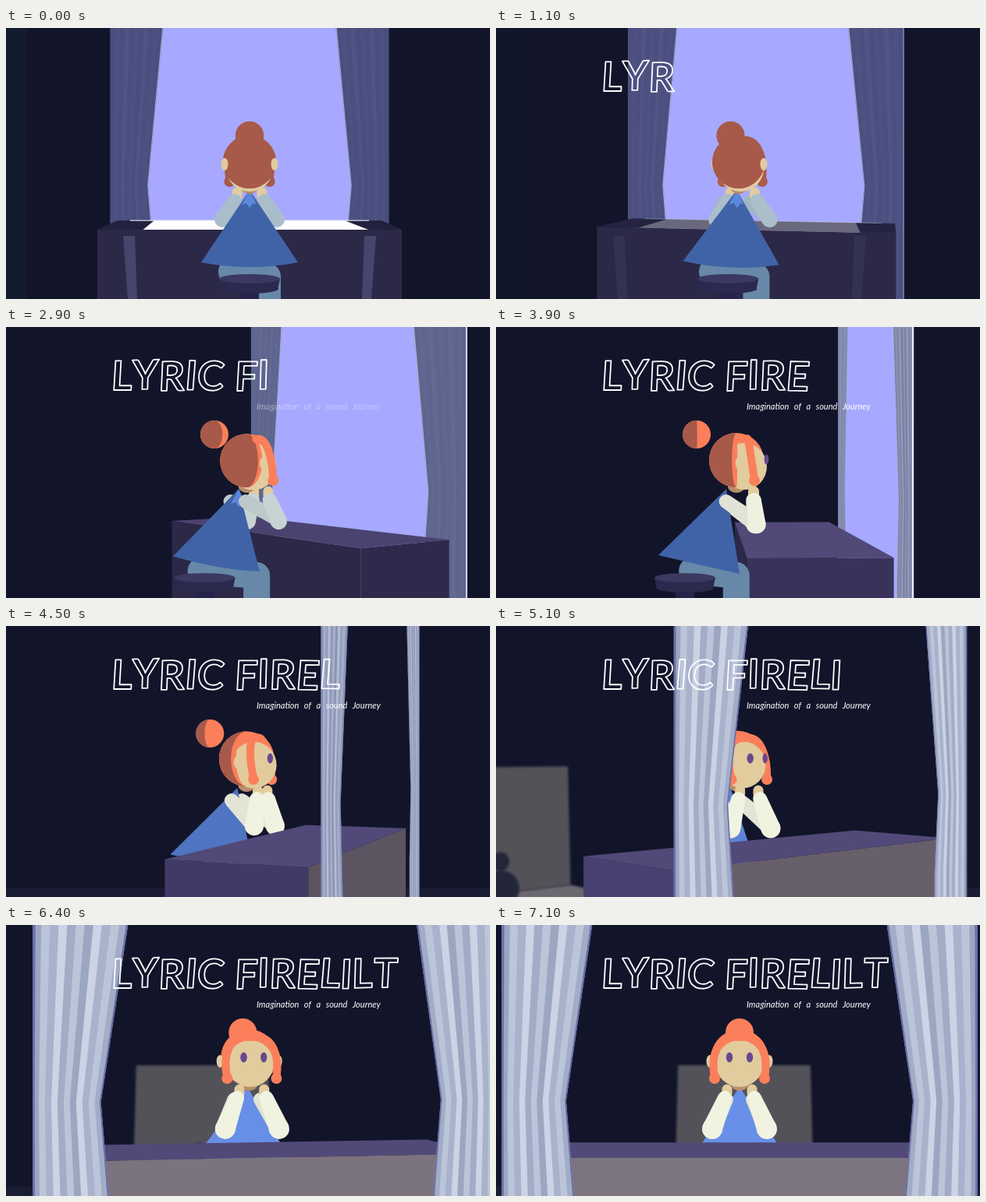
An HTML page with a canvas for the animation above (7200 ms loop, 620 px wide and 348 px high).

```html
<!DOCTYPE html>
<html>
<head>
<meta charset="utf-8">
<style>
html, body { margin: 0; width: 100%; height: 100%; overflow: hidden; background: #12152a; }
canvas { display: block; }
</style>
</head>
<body>
<canvas id="stage" width="620" height="348"></canvas>
<script>
const ctx = document.getElementById('stage').getContext('2d');
const LOOP = 7200, STEP = 100, FLOOR = 360, CENTER = 312, HORIZON = 168, CAMERA = 900;
const TITLE = [['LYRIC', 134], ['FIRELILT', 292]];
const SUBTITLE = 'Imagination of a sound Journey';
const SKIN = '#e2cb9d', HAIR = [250, 127, 90], HAIR_DARK = [167, 89, 74];
const SIDES = [-1, 1];

// Camera orbit: times in ms and degrees around the girl
const TIMES = [0, 2000, 2900, 3900, 5100, 5800, 7100];
const TURN = [0, 30, 55, 88, 137, 157, 180];

let time, angle, cos, sin, front;  // front: 0 behind the girl, 1 facing her

const clamp = v => Math.max(0, Math.min(1, v));
const mix = (a, b, f) => `rgb(${a.map((v, i) => Math.round(v + (b[i] - v) * clamp(f)))})`;

// Smooth curve through the orbit keys, at rest on both ends
function orbit() {
  const last = TIMES.length - 1;
  let i = 0;
  while (i < last - 1 && time >= TIMES[i + 1]) i++;
  const span = TIMES[i + 1] - TIMES[i], u = (time - TIMES[i]) / span;
  const slope = k => k % last === 0 ? 0
    : (TURN[k + 1] - TURN[k - 1]) / (TIMES[k + 1] - TIMES[k - 1]) * span;
  const rise = TURN[i + 1] - TURN[i], a = slope(i), b = slope(i + 1);
  return TURN[i] + u * (a + u * (3 * rise - 2 * a - b + u * (a + b - 2 * rise)));
}

// Position after the turn: flat for the girl, in perspective for the room
const depth = (x, z) => z * cos - x * sin;
const screenX = (x, z) => CENTER + x * cos + z * sin;
function project(x, height, z) {
  const scale = (1.1 - .11 * cos) / (1 + depth(x, z) / CAMERA);
  return [CENTER + (x * cos + z * sin) * scale, HORIZON + height * scale];
}

function poly(color, ...points) {
  ctx.fillStyle = color;
  ctx.beginPath();
  for (const p of points) ctx.lineTo(...p);
  ctx.fill();
}

function oval(color, x, y, rx, ry = rx) {
  ctx.fillStyle = color;
  ctx.beginPath();
  ctx.ellipse(x, y, rx, ry, 0, 0, 7);
  ctx.fill();
}

function limb(color, width, ...points) {
  ctx.strokeStyle = color;
  ctx.lineWidth = width;
  ctx.lineCap = ctx.lineJoin = 'round';
  ctx.beginPath();
  for (const p of points) ctx.lineTo(...p);
  ctx.stroke();
}

// Round-ended shape from a circle of radius r1 to one of radius r2
function taper(color, x1, y1, r1, x2, y2, r2) {
  const a = Math.atan2(y2 - y1, x2 - x1) + Math.PI / 2, c = Math.cos(a), s = Math.sin(a);
  oval(color, x1, y1, r1);
  oval(color, x2, y2, r2);
  poly(color, [x1 + r1 * c, y1 + r1 * s], [x2 + r2 * c, y2 + r2 * s],
    [x2 - r2 * c, y2 - r2 * s], [x1 - r1 * c, y1 - r1 * s]);
}

// The part of a ball left of its terminator; k runs from -1 (none) to 1 (all)
function ballSide(color, x, y, r, k) {
  if (k <= -1) return;
  ctx.fillStyle = color;
  ctx.beginPath();
  ctx.arc(x, y, r, Math.PI / 2, Math.PI * 1.5);
  ctx.ellipse(x, y, r * Math.abs(k), r, 0, -Math.PI / 2, Math.PI / 2, k < 0);
  ctx.fill();
}

function room(outside) {
  ctx.fillStyle = '#12152a';
  ctx.fillRect(0, 0, 620, 348);
  if (!outside) {
    ctx.globalAlpha = clamp(1 - time / 1500);
    ctx.fillStyle = '#131b2e';
    ctx.fillRect(0, 0, 26, 348);
    ctx.globalAlpha = 1;
    return;
  }
  ctx.fillStyle = '#1a1c33';
  ctx.fillRect(0, 336, 620, 12);
  const wall = (x, h) => project(x, h, -550), [shadowX, shadowY] = wall(0, 165);
  ctx.filter = 'blur(1.5px)';
  poly('#535259', wall(-121, 16), wall(105, 16), wall(110, 215), wall(-126, 215));
  poly('#6b6870', wall(-126, 215), wall(110, 215), project(110, 215, -400), project(-126, 215, -400));
  oval('#23253a', shadowX, shadowY, 11, 12);
  oval('#23253a', shadowX, shadowY + 35, 24);
  ctx.filter = 'none';
}

function curtain(side, outside) {
  const at = (x, h) => project(side * x, h, 150);
  const [outer] = at(210, 0), [top] = at(130, 0), waist = at(153, 40), hem = at(146, 124);
  const panel = (color, a, b) => {
    const x = (edge, f) => outer + (edge - outer) * f;
    poly(color, [x(top, a), 0], [x(top, b), 0], [x(waist[0], b), waist[1]], [x(hem[0], b), hem[1]],
      [x(hem[0], b), FLOOR], [x(hem[0], a), FLOOR], [x(hem[0], a), hem[1]], [x(waist[0], a), waist[1]]);
  };
  panel(mix([73, 78, 126], [155, 166, 193], front * 1.15), 0, 1);
  const folds = 11, strength = .03 + .6 * clamp(front * 1.6 - .4);
  for (let i = 1; i < folds; i++) {
    const light = i % 2 ? .5 + i * 5 % 4 / 6 : i % 3 / 8;
    panel(`rgba(232,238,250,${strength * light})`, i / folds, (i + 1) / folds);
  }
  if (outside) panel('#6a70ab', 0, .03);
  panel(outside ? '#686ba8' : 'rgba(225,228,255,.6)', .98, 1);
}

function windowView() {
  const [left] = project(-210, 0, 150), [right] = project(210, 0, 150);
  ctx.fillStyle = '#a6a9ff';
  ctx.fillRect(left, 0, right - left, 348);
  for (const side of SIDES) curtain(side, false);
  limb(`rgba(240,242,255,${sin})`, 2, [right - 1, 0], [right - 1, FLOOR]);
}

function desk() {
  const top = (x, z) => project(x * 197, 92, z);
  const a = top(-1, 135), b = top(1, 135), c = top(1, 0), d = top(-1, 0);
  const face = (color, p, q) => {
    if (q[0] > p[0]) poly(color, p, q, [q[0], FLOOR], [p[0], FLOOR]);
  };
  face('#2c2847', d, c);
  face(mix([39, 34, 63], [77, 69, 120], front), c, b);
  face(mix([92, 84, 96], [124, 116, 126], front * 5 - 4), b, a);
  poly(mix([34, 33, 62], [81, 73, 120], front * 4), a, b, c, d);
  ctx.globalAlpha = clamp(1 - time / 1600);
  poly('#fff', top(-.72, 135), top(.72, 135), top(.78, 0), top(-.7, 0));
  limb('#fff', 1, top(-.9, 135), top(.9, 135));
  for (const side of SIDES) {
    const x = CENTER + side * 190;
    poly('#46466c', [x - side * 28, 267], [x - side * 43, 267], [x - side * 46, 348], [x - side * 34, 348]);
  }
  ctx.globalAlpha = 1;
}

function arm(side) {
  const light = front * 2, color = mix([170, 189, 202], [241, 243, 225], light);
  const shade = mix([160, 180, 194], [226, 229, 214], light);
  const elbow = screenX(side * 35, 21), elbowY = 252 - 8 * cos, r = 11.5 - 1.5 * cos;
  const hand = screenX(side * 16, 18);
  taper(shade, screenX(side * 17, -18), 224, 9, elbow, elbowY, r - 1);
  limb(SKIN, 13, [hand, 211], [hand, 216]);
  taper(color, elbow, elbowY + 2, r, hand + side * cos * 3, 222, 9);
}

function lock(side) {
  const spread = side * (.9 - .1 * cos), at = (x, z) => screenX(spread * x, z);
  const color = mix(HAIR_DARK, HAIR, front * 5), tip = at(32, 18);
  ctx.strokeStyle = color;
  ctx.lineWidth = 10;
  ctx.lineCap = 'round';
  ctx.beginPath();
  ctx.moveTo(at(0, 10), 144);
  ctx.bezierCurveTo(at(30, 10), 140, at(37, 14), 170, tip, 196);
  ctx.stroke();
  oval(color, tip, 197, 7);
}

function bun() {
  const x = screenX(0, -55);
  oval(mix(HAIR_DARK, HAIR, front * 5), x, 138, 18);
  ballSide(mix(HAIR_DARK, HAIR, 0), x, 138, 18, cos);
}

const earX = side => side * (35 - 3 * cos);
const ear = side => oval(SKIN, screenX(earX(side), -2), 175, 4.5, 8);

function head() {
  const x = CENTER - 4 * sin, y = 171 + cos, r = 35 - cos;
  const lit = mix(HAIR_DARK, HAIR, front * 5), dark = mix(HAIR_DARK, HAIR, 0);
  const farLock = s => depth(s * 30, 18) > 0, farEar = s => depth(earX(s), -2) > 0;
  const bunInFront = depth(0, -55) < 0;
  oval('#b98d6b', x, 204, 11, 9);
  if (!bunInFront) bun();
  SIDES.filter(farLock).forEach(lock);
  SIDES.filter(farEar).forEach(ear);
  oval(lit, x, y, r);
  oval(SKIN, CENTER + 6 * sin, 179 + cos, 30 - sin, 30);
  ballSide(lit, x, y, r, cos);
  ballSide(dark, x, y, r, cos - .2 * sin);
  SIDES.filter(s => !farEar(s)).forEach(ear);
  for (const s of SIDES) {
    const d = depth(s * 13, 34);
    if (d < -3) oval('#67488f', screenX(s * 13, 34), 170, 2.2 - d / 17, 6.5);
  }
  SIDES.filter(s => !farLock(s)).forEach(lock);
  if (bunInFront) bun();
}

function dress() {
  const x = screenX(0, -17), y = 208, middle = screenX(0, -52), half = Math.hypot(62 * cos, 52 * sin);
  const tilt = 12 * sin, hem = 301 + 4 * sin;
  ctx.fillStyle = mix([64, 99, 168], [104, 144, 232], front * 2 - 1);
  ctx.beginPath();
  ctx.moveTo(x, y);
  ctx.lineTo(middle - half, hem - tilt);
  ctx.quadraticCurveTo(middle, hem + 12 * Math.max(0, cos), middle + half, hem + tilt);
  ctx.fill();
  if (cos > .3) {
    poly('#5c87dc', [x, y], [x - 10, y + 19], [x - 4, y + 17], [x, y + 23], [x + 5, y + 17], [x + 9, y + 19]);
  }
}

function stool() {
  const x = screenX(0, -70), y = 322;
  poly('#2b294d', [x - 39, y], [x + 39, y], [x + 36, y + 14], [x - 36, y + 14]);
  oval('#2b294d', x, y + 13, 37, 6);
  oval('#3b3961', x, y, 39, 6);
  poly('#25234a', [x - 12, y + 18], [x + 12, y + 18], [x + 12, FLOOR], [x - 12, FLOOR]);
}

function girl() {
  const near = s => depth(s * 35, 21) < 0, knee = screenX(23, -5);
  SIDES.filter(s => !near(s)).forEach(arm);
  limb('#6788a8', 34, [screenX(-23, -60), 313], [knee, 319], [knee, FLOOR]);
  dress();
  stool();
  const parts = [() => SIDES.filter(near).forEach(arm), head];
  if (cos < -.5) parts.reverse();
  parts.forEach(part => part());
}

function lettering() {
  let n = 0;
  ctx.font = '700 52px Lato, sans-serif';
  ctx.strokeStyle = '#fff';
  ctx.lineWidth = 1.8;
  for (let [word, x] of TITLE) {
    for (const letter of word) {
      const start = Math.max(100 + n * 250, n * 500 - 220);
      ctx.save();
      ctx.globalAlpha = clamp((time - start) / 120);
      ctx.translate(x, 81 + Math.sin(n * 4));
      ctx.rotate(Math.sin(n * 5) * .03);
      ctx.transform(1, 0, -.06, 1, 0, 0);
      ctx.strokeText(letter, 0, 0);
      ctx.restore();
      x += ctx.measureText(letter).width;
      n++;
    }
  }
  const shown = (time - 2600) / 1000;
  const fade = ctx.createLinearGradient(321, 0, 480, 0);
  fade.addColorStop(0, `rgba(255,255,255,${clamp(shown * 1.5)})`);
  fade.addColorStop(1, `rgba(255,255,255,${clamp(shown)})`);
  ctx.fillStyle = fade;
  ctx.font = 'italic 400 11px Lato, sans-serif';
  ctx.wordSpacing = '4px';
  ctx.fillText(SUBTITLE, 321, 106);
  ctx.wordSpacing = '0px';
}

function draw() {
  time = Math.floor(performance.now() % LOOP / STEP) * STEP;
  angle = orbit();
  cos = Math.cos(angle * Math.PI / 180);
  sin = Math.sin(angle * Math.PI / 180);
  front = (1 - cos) / 2;
  const outside = project(130, 0, 150)[0] < project(-130, 0, 150)[0];
  const pastDesk = angle > 112;
  room(outside);
  if (!outside) windowView();
  else if (!pastDesk) curtain(-1, true);
  const layers = pastDesk ? [girl, desk] : [desk, girl];
  layers.forEach(layer => layer());
  if (pastDesk) curtain(-1, true);
  if (outside) curtain(1, true);
  lettering();
  requestAnimationFrame(draw);
}
draw();
</script>
</body>
</html>
```
